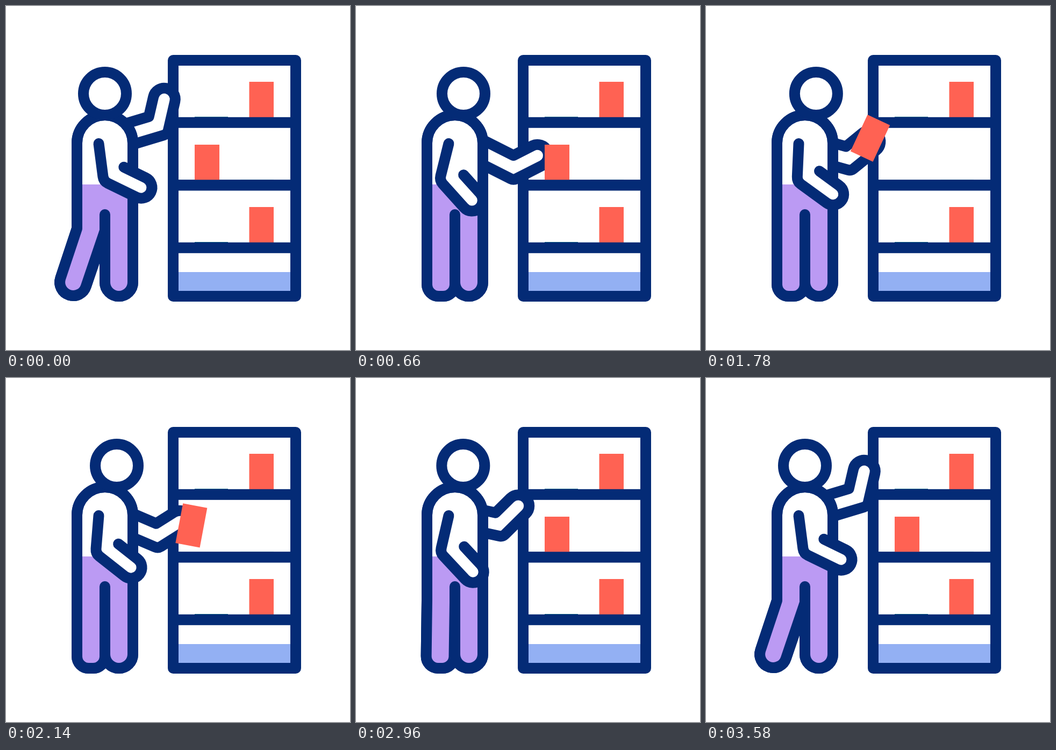
Animation, 640 px wide and 640 px high, one loop 3600 ms. Source, as an HTML page with a canvas:

```html
<!DOCTYPE html>
<html lang="en">
<head>
<meta charset="utf-8">
<style>
  html, body { margin: 0; width: 100%; height: 100%; overflow: hidden; background: #fff; }
  canvas { display: block; }
</style>
</head>
<body>
<canvas id="stage" width="640" height="640"></canvas>
<script>
const ctx = document.getElementById('stage').getContext('2d');
const NAVY = '#042b76', RED = '#ff6253', PURPLE = '#bb9af3', BLUE = '#93b0f3', TEAL = '#0b5a80';
const LOOP = 3600, RAD = Math.PI / 180;

const mix = (a, b, u) => a + (b - a) * u;

// Eases from 0 to 1 between two times
function ramp(t, start, end) {
  const u = Math.min(1, Math.max(0, (t - start) / (end - start)));
  return u * u * (3 - 2 * u);
}

function rect(color, x, y, w, h) {
  ctx.fillStyle = color;
  ctx.fillRect(x, y, w, h);
}

function paint() {
  ctx.fillStyle = '#fff';
  ctx.fill();
  ctx.stroke();
}

const shelfY = i => 216.8 + 116.5 * i;

function bar(i) {
  rect(NAVY, 311, shelfY(i) - 10, 228, 20);
}

function drawShelf() {
  rect(BLUE, 321, 495, 208, 36);
  for (let i = 0; i < 3; i++) {
    const odd = i % 2;
    if (!odd) rect(RED, 452.5, shelfY(i) - 75.8, 45.5, 70);
    bar(i);
    rect(TEAL, odd ? 436 : 351, Math.floor(shelfY(i)) - 10, 62, 1);
  }
  ctx.strokeRect(311, 101, 228, 439);
}

function drawFarArm(reach, pull) {
  const dip = Math.sin(Math.PI * reach), r = 20.5;
  const ex = mix(283, 293, reach) - 26 * dip - 28 * pull;
  const ey = mix(222, 301, reach) - 17 * pull;
  const sx = 200, sy = mix(247, 254, reach) + 8 * dip + 12 * pull;
  const fore = (mix(-77, -27, reach) - 12 * pull) * RAD;
  const upper = Math.atan2(ey - sy, ex - sx);
  const hx = ex + 50 * Math.cos(fore), hy = ey + 50 * Math.sin(fore);

  // Offsets from the bone to the sleeve edge; the elbow one is mitred
  const nx = -Math.sin(upper) * r, ny = Math.cos(upper) * r;
  const fx = -Math.sin(fore) * r, fy = Math.cos(fore) * r;
  const miter = 1 / (1 + Math.cos(fore - upper));
  const mx = (nx + fx) * miter, my = (ny + fy) * miter;

  ctx.beginPath();
  ctx.moveTo(sx + nx, sy + ny);
  ctx.arcTo(ex + mx, ey + my, hx + fx, hy + fy, 12);
  ctx.arc(hx, hy, r, fore + Math.PI / 2, fore - Math.PI / 2, true);
  ctx.lineTo(ex - mx, ey - my);
  ctx.lineTo(sx - nx, sy - ny);
  paint();
}

function drawBook(pull) {
  ctx.save();
  ctx.translate(374 - 68.5 * pull, 295.5 - 49.5 * pull);
  ctx.rotate(25 * RAD * pull);
  rect(RED, -23, -37.5, 46, 75);
  ctx.restore();
}

function drawBody(stand) {
  const tilt = mix(18, 0, stand) * RAD, footX = mix(125, 158, stand), footY = 514;
  const r = mix(25, 26, stand), round = mix(25, 22, stand);
  // Point in the leg's own frame: across and along, in foot radii
  const foot = (across, along) => [
    footX + r * (across * Math.cos(tilt) - along * Math.sin(tilt)),
    footY + r * (across * Math.sin(tilt) + along * Math.cos(tilt))];

  ctx.beginPath();
  ctx.moveTo(184, 388);
  ctx.arc(210, 514, 26, Math.PI, 0, true);
  ctx.arc(184, 255, 52, 0, Math.PI, true);
  ctx.lineTo(132, 414);
  ctx.arcTo(...foot(-1, 1), ...foot(1, 1), round);
  ctx.arcTo(...foot(1, 1), ...foot(1, 0), round);
  ctx.lineTo(...foot(1, 0));
  ctx.lineTo(184, 418);
  ctx.closePath();
  paint();
  ctx.save();
  ctx.clip();
  rect(PURPLE, 80, 332, 180, 220);
  ctx.restore();
  ctx.stroke();
}

function drawHead(x) {
  ctx.beginPath();
  ctx.arc(x, 163, 40, 0, 2 * Math.PI);
  paint();
}

function drawNearArm(stand, lift) {
  const upper = (mix(7.4, -14, stand) + 11.5 * lift) * RAD;
  const fore = (mix(26, 48, stand) - 12 * lift) * RAD;
  const sx = 172.5, sy = 256, r = 20, c = Math.cos(fore), s = Math.sin(fore);
  const ex = sx + 70.5 * Math.sin(upper), ey = sy + 70.5 * Math.cos(upper);
  const hx = ex + 68 * c + r * s, hy = ey + 68 * s - r * c;
  ctx.beginPath();
  ctx.moveTo(sx, sy);
  ctx.arcTo(ex, ey, hx - r * s, hy + r * c, 16);
  ctx.arc(hx, hy, r, fore + Math.PI / 2, fore - Math.PI / 2, true);
  ctx.lineTo(hx + r * s - 45.6 * c, hy - r * c - 45.6 * s);
  paint();
}

function draw(now) {
  const t = now % LOOP;
  const stand = ramp(t, 0, 560) - ramp(t, 2880, 3540);
  const reach = ramp(t, 0, 640) - ramp(t, 2560, 3560);
  const pull = ramp(t, 720, 1620) - ramp(t, 1800, 2420);
  const lift = ramp(t, 720, 1620) - ramp(t, 1800, 3040);
  const nod = ramp(t, 1220, 2000) - ramp(t, 2460, 2940);

  ctx.clearRect(0, 0, 640, 640);
  ctx.strokeStyle = NAVY;
  ctx.lineWidth = 20;
  ctx.lineJoin = ctx.lineCap = 'round';
  drawShelf();
  drawFarArm(reach, pull);
  drawBook(pull);
  bar(1);
  drawBody(stand);
  drawHead(mix(184, 200, stand) + 6 * nod);
  drawNearArm(stand, lift);
  requestAnimationFrame(draw);
}
requestAnimationFrame(draw);
</script>
</body>
</html>
```
